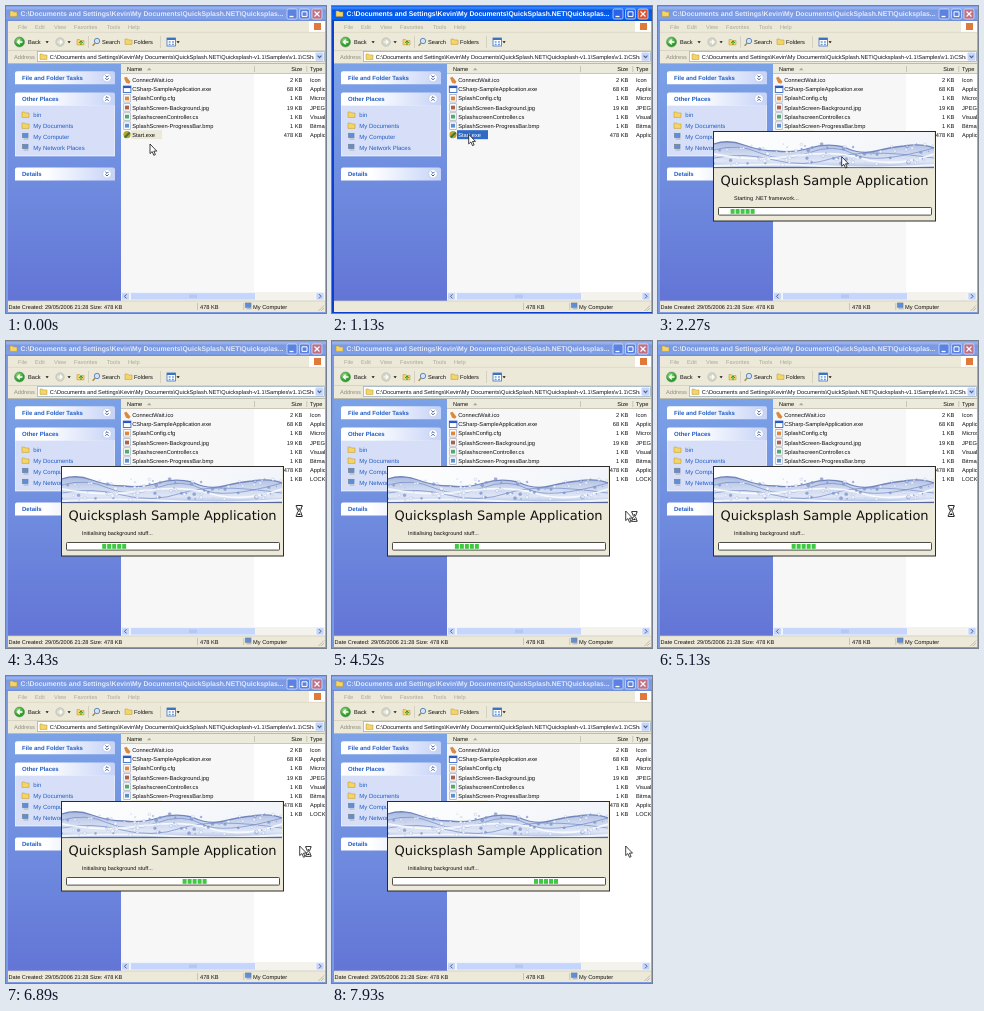
An HTML page that plays this animation: 320x307 px, repeating every 7990 ms.

```html
<!DOCTYPE html>
<html lang="en">
<head>
<meta charset="utf-8">
<title>Splash screen demo</title>
<style>
  html, body { margin: 0; width: 100%; height: 100%; overflow: hidden; }
  svg { display: block; width: 100vw; height: 100vh; }
  text { font-family: "Liberation Sans", Arial, sans-serif; font-size: 5.7px; text-rendering: geometricPrecision; white-space: pre; }
  .bold { font-weight: bold; font-size: 6px; }
  .link { font-size: 6px; }
</style>
</head>
<body>
<svg id="stage" viewBox="0 0 320 307" preserveAspectRatio="none">
  <defs>
    <linearGradient id="active" x2="0" y2="1">
      <stop offset="0" stop-color="#0a5be8"/><stop offset=".12" stop-color="#3a8cff"/>
      <stop offset=".3" stop-color="#0555e2"/><stop offset=".85" stop-color="#0663f5"/><stop offset="1" stop-color="#0342b8"/>
    </linearGradient>
    <linearGradient id="inactive" x2="0" y2="1">
      <stop offset="0" stop-color="#7697e7"/><stop offset=".12" stop-color="#9db6f0"/>
      <stop offset=".3" stop-color="#7b98e2"/><stop offset=".85" stop-color="#7f9fe9"/><stop offset="1" stop-color="#6c88d4"/>
    </linearGradient>
    <linearGradient id="pane" x2="0" y2="1"><stop offset="0" stop-color="#7ba2e7"/><stop offset="1" stop-color="#6375d6"/></linearGradient>
    <linearGradient id="head"><stop offset=".3" stop-color="#fff"/><stop offset="1" stop-color="#c6d3f7"/></linearGradient>
    <linearGradient id="sky" x2="1" y2=".2"><stop offset="0" stop-color="#fff"/><stop offset="1" stop-color="#f1f4f9"/></linearGradient>
    <linearGradient id="water" x2="0" y2="1">
      <stop offset="0" stop-color="#a9b8df"/><stop offset=".4" stop-color="#cbd6ee"/>
      <stop offset=".75" stop-color="#dfe7f6"/><stop offset="1" stop-color="#aebfe4"/>
    </linearGradient>
    <radialGradient id="green" cx=".4" cy=".35"><stop offset="0" stop-color="#a4e28f"/><stop offset="1" stop-color="#2c9a2c"/></radialGradient>
    <clipPath id="banner"><rect x="56" y="126" width="220" height="36"/></clipPath>
    <clipPath id="field"><rect x="34" y="45" width="274" height="11"/></clipPath>
  </defs>
</svg>
<script>
const NS = "http://www.w3.org/2000/svg";
const stage = document.getElementById("stage");
const LOOP = 7990, INK = "#111", BEIGE = "#ece9d8", BLUE = "#215dc6";

function add(tag, attrs, parent = stage) {
  const el = document.createElementNS(NS, tag);
  for (const k in attrs) el.setAttribute(k, attrs[k]);
  parent.appendChild(el);
  return el;
}
const group = (parent = stage) => add("g", {}, parent);
const rect = (x, y, width, height, fill, parent, more) => add("rect", { x, y, width, height, fill, ...more }, parent);
const path = (d, fill, parent, more) => add("path", { d, fill, ...more }, parent);
const line = (d, stroke, width, parent, more) => path(d, "none", parent, { stroke, "stroke-width": width, ...more });
const circle = (cx, cy, r, fill, parent, more) => add("circle", { cx, cy, r, fill, ...more }, parent);
function label(x, y, str, parent, more) {
  const el = add("text", { x, y, fill: INK, ...more }, parent);
  el.textContent = str;
  return el;
}
const show = (el, on) => el.setAttribute("display", on ? "inline" : "none");

const FOLDER = "C:\\Documents and Settings\\Kevin\\My Documents\\QuickSplash.NET\\Quicksplash";

function folderIcon(x, y) {
  path(`M${x} ${y + 1}h2.6l1 1h3.4v4.4h-7z`, "#f4d568", stage, { stroke: "#b8912e", "stroke-width": .5 });
}
function computerIcon(x, y) {
  rect(x, y, 5.5, 4.3, "#5a8fe0", stage, { stroke: "#77808c", "stroke-width": .7 });
  rect(x + 1, y + 5, 5, 1.4, "#b8bcc4");
}
function dropArrow(x, y) { path(`M${x} ${y}h3.2l-1.6 1.9z`, INK); }

// Window frame and title bar
const frameBox = rect(0, 0, 320, 307, "#7b98e2");
const titleBar = rect(0, 0, 320, 15, "url(#inactive)");
folderIcon(4, 4);
const titleText = label(14.5, 10.3, FOLDER.slice(0, -1) + "...", stage, { "font-weight": "bold", style: "font-size:6.83px" });
const buttons = [281, 293.5, 306].map(x => rect(x, 3, 10, 10, "#000", stage, { rx: 1.5, stroke: "#e4ebfb", "stroke-width": .7 }));
line("M283.5 10.5h4", "#fff", 1.3);
line("M296 5.8h5v4.6h-5z", "#fff", 1);
line("M308.5 5.5l5 5m0-5l-5 5", "#fff", 1.2);
rect(2, 15, 317, 291, BEIGE);

// Menu
const menu = [["File", 12], ["Edit", 29], ["View", 48], ["Favorites", 68], ["Tools", 101], ["Help", 122]];
for (const [name, x] of menu) label(x, 22.6, name, stage, { fill: "#aca899" });
rect(303, 15, 16, 11, "#fff");
rect(308, 17, 7, 7, "#e07a3a");
line("M2 26.3h317", "#d3cfbf", .6);

// Toolbar
circle(13.5, 36, 5, "url(#green)", stage, { stroke: "#4a934a", "stroke-width": .5 });
line("M16.5 36h-5m2.3-2.4l-2.4 2.4 2.4 2.4", "#fff", 1.3);
label(22, 38, "Back");
dropArrow(39.5, 35.3);
circle(54, 36, 4.2, "#d5d8c8", stage, { stroke: "#a9ac9c", "stroke-width": .5 });
line("M51.7 36h4.2m-1.9-2l2 2-2 2", "#fff", 1.1);
dropArrow(61.5, 35.3);
folderIcon(71, 32.5);
line("M75 39v-4m-1.8 2l1.8-2.2 1.8 2.2", "#2b9b33", 1);
rect(82, 30, .6, 12, "#c5c2b2");
circle(91, 35, 2.7, "#cfe4fa", stage, { stroke: "#5a7fae", "stroke-width": .9 });
line("M89 37.2l-2.4 2.6", "#a98238", 1.3);
label(96, 38, "Search");
folderIcon(119, 32);
label(128, 38, "Folders");
rect(154, 30, .6, 12, "#c5c2b2");
rect(161, 32, 8.5, 8, "#fff", stage, { stroke: "#3b72c4", "stroke-width": .8 });
rect(161, 32, 8.5, 2, "#3b72c4");
for (const x of [162.7, 166]) for (const y of [35.2, 37.7]) rect(x, y, 1.9, 1.5, "#6f9be0");
dropArrow(170.5, 35.3);
rect(2, 44, 317, .6, "#cbc7b6");

// Address row
label(8, 52.7, "Address", stage, { fill: "#8f8c80" });
rect(31.5, 45.7, 287, 9.8, "#fff", stage, { stroke: "#7f9db9", "stroke-width": .6 });
folderIcon(34, 47);
label(43.7, 52.6, FOLDER + "-v1.1\\Samples\\v1.1\\CSharp", stage, { style: "font-size:5.67px", "clip-path": "url(#field)" });
rect(309.5, 46.5, 8, 8.2, "#c6d5fb", stage, { rx: 1 });
line("M311.6 49.7l1.9 1.9 1.9-1.9", "#4d6185", 1.1);
rect(2, 57, 317, .7, "#aca899");

// Side pane
rect(2, 58, 113, 237, "url(#pane)");
function paneHeader(y, str, open) {
  path(`M9 ${y + 13}v-11q0-2 2-2h96q2 0 2 2v11z`, "url(#head)");
  label(16, y + 8.6, str, stage, { class: "bold", fill: BLUE });
  circle(101, y + 6.3, 4.2, "#fff", stage, { stroke: "#b6c4e6", "stroke-width": .6 });
  const s = open ? -1 : 1, cy = y + 6.3;
  line(`M99.4 ${cy - 2 * s}l1.6 ${1.6 * s} 1.6 ${-1.6 * s}M99.4 ${cy + .6 * s}l1.6 ${1.6 * s} 1.6 ${-1.6 * s}`, "#21428f", .9);
}
paneHeader(65.3, "File and Folder Tasks", false);
rect(9.3, 99, 99.4, 51, "#d6dff7", stage, { stroke: "#fff", "stroke-width": .6 });
paneHeader(86.5, "Other Places", true);
["bin", "My Documents", "My Computer", "My Network Places"].forEach((name, i) => {
  const y = 109 + 11 * i;
  if (i < 2) folderIcon(16, y - 4); else computerIcon(16.5, y - 3.7);
  label(27.3, y + 2, name, stage, { class: "link", fill: BLUE });
});
paneHeader(161.5, "Details", false);

// File list
rect(115, 58, 204, 237, "#fff");
rect(115, 68, 133, 218, "#f7f7f7");
rect(115, 58, 204, 10, "#ebeadb");
rect(115, 67, 204, 1, "#cbc7b8");
for (const x of [248, 300.5]) rect(x, 60, .7, 6, "#b9b6a6");
label(121, 65.1, "Name");
path("M141 64.3h4.4l-2.2-2.6z", "#aca899");
const SIZE_X = 296.3, TYPE_X = 304;
function sizeAndType(y, size, type, parent) {
  label(SIZE_X, y, size, parent, { "text-anchor": "end" });
  label(TYPE_X, y, type, parent);
}
sizeAndType(65.1, "Size", "Type");

const files = [
  ["ConnectWait.ico", "2 KB", "Icon", "#d98a3c"],
  ["CSharp-SampleApplication.exe", "68 KB", "Application", "#2456c4"],
  ["SplashConfig.cfg", "1 KB", "Microsoft", "#e0873e"],
  ["SplashScreen-Background.jpg", "19 KB", "JPEG Image", "#a8624e"],
  ["SplashscreenController.cs", "1 KB", "Visual C#", "#54a868"],
  ["SplashScreen-ProgressBar.bmp", "1 KB", "Bitmap", "#5a90d0"],
  ["Start.exe", "478 KB", "Application", "#c2a02a"]
];
const rowY = i => 74.2 + 9.08 * i;
function fileIcon(i, y, color) {
  if (i === 0) {
    path(`M118 ${y - 2.5}l2.5-1 4 5-1.5 2-3-1z`, color);
  } else if (i === 1) {
    rect(117.3, y - 3.2, 7.6, 6.4, "#fff", stage, { stroke: color, "stroke-width": .8 });
    rect(117.3, y - 3.2, 7.6, 2, color);
  } else if (i === 6) {
    circle(121, y, 3.6, color);
    path(`M118 ${y + 2}l5-5 1.5 1.5-5 5z`, "#3f7a34");
  } else {
    rect(117.8, y - 3.7, 6.4, 7.4, "#fff", stage, { stroke: "#8a97ad", "stroke-width": .6 });
    rect(119, y - 1.8, 4, 3.8, color);
  }
}
const pick = rect(125, rowY(6) - 4.5, 31, 9, BEIGE);
let startName;
files.forEach(([name, size, type, color], i) => {
  const y = rowY(i);
  fileIcon(i, y, color);
  startName = label(126.2, y + 2.1, name);
  sizeAndType(y + 2.1, size, type);
});
const lockRow = group();
sizeAndType(rowY(7) + 2.1, "1 KB", "LOCK File", lockRow);
rect(319, 15, 1, 291, "#93abe6");

// Horizontal scroll bar
rect(115, 286, 204, 8.6, "#f3f2ec");
for (const [x, width] of [[115.5, 8], [124.5, 125], [310, 8]])
  rect(x, 286.6, width, 7.4, "#c6d5fb", stage, { rx: 1, stroke: "#fff", "stroke-width": .6 });
line("M120.5 288.2l-2 2.1 2 2.1M313 288.2l2 2.1-2 2.1", "#4d6185", 1);
line("M184 288.6v3.6m2-3.6v3.6m2-3.6v3.6m2-3.6v3.6", "#9db4ea", .8);

// Status bar
rect(2, 295, 317, 11, BEIGE);
rect(2, 294.6, 317, .7, "#c5c2b2");
for (const x of [191, 237.5]) rect(x, 297, .7, 7, "#b9b6a6");
const statusText = label(2.5, 303, "Date Created: 29/05/2006 21:28 Size: 478 KB", stage, { style: "font-size:5.6px" });
label(194, 303, "478 KB");
computerIcon(239.5, 297);
label(247, 303, "My Computer");
line("M312.5 305l5.5-5.5m-3 5.5l3-3", "#b9b6a6", .9);

// Splash window
const splash = group();
rect(55.5, 125.5, 222, 89.5, BEIGE, splash, { stroke: "#2b2b2b", "stroke-width": 1 });
const banner = add("g", { "clip-path": "url(#banner)" }, splash);
const surface = "M56 138q14-5 30 1t32 6q18 2 34-3t34-1q16 8 32 4t28-5q18-3 30 2";
rect(56, 126, 220, 36, "url(#sky)", banner);
path(surface + "v20h-220z", "url(#water)", banner);
line(surface, "#7286bd", 1.3, banner);
line("M56 144q24-7 46 3t48 0 46 1 80-6M56 152q30-6 60 2t60-2 100 0", "#7389c4", 1, banner, { opacity: .7 });
line("M56 148q40 8 80 2t70 3 70-5M56 160q60-3 110 0t110-1", "#fff", 1.8, banner, { opacity: .8 });
let seed = 7;
const random = () => (seed = seed * 16807 % 2147483647) / 2147483647;
for (let i = 0; i < 110; i++) {
  const x = 56 + random() * 220, y = 138 + random() * 21;
  circle(x, y, .4 + random() * 1.4, i % 3 ? "#f6f9fe" : "#8598cc", banner, { opacity: .8, stroke: "#6f86c0", "stroke-width": .25 });
}
rect(56, 161.2, 220, .9, "#3d5286", splash);
label(62.6, 179, "Quicksplash Sample Application", splash, { style: 'font-family:"DejaVu Sans",Verdana,sans-serif;font-size:13px' });
const message = label(76, 193.8, "", splash, { style: "font-size:5.5px" });
rect(60.5, 201.5, 213, 7.6, "#fff", splash, { stroke: "#4d4d48", "stroke-width": 1, rx: .8 });
const blocks = group(splash);
for (let i = 0; i < 5; i++) rect(i * 5 + .6, 203, 4, 4.8, "#3fc943", blocks);

// Pointer
const pointer = group();
const arrow = path("M0 0v9.6l2.2-2 1.6 3.7 1.6-.7-1.6-3.5h3z", "#fff", pointer, { stroke: "#111", "stroke-width": .8 });
const glass = group(pointer);
path("M0 0h6v1.2h-.6q0 2.8-1.8 4.3 1.8 1.5 1.8 4.3h.6v1.2h-6v-1.2h.6q0-2.8 1.8-4.3-1.8-1.5-1.8-4.3h-.6z", "#fff", glass, { stroke: "#111", "stroke-width": .9 });
path("M1.8 3h2.4l-1.2 2zM1.4 9.4l1.6-2 1.6 2z", "#111", glass);

// Linear interpolation through [time, value] points
function track(points, t) {
  if (t <= points[0][0]) return points[0][1];
  for (let i = 1; i < points.length; i++) {
    const [t0, v0] = points[i - 1], [t1, v1] = points[i];
    if (t <= t1) return v0 + (v1 - v0) * (t - t0) / (t1 - t0);
  }
  return points[points.length - 1][1];
}
const progress = [[1850, 63], [2270, 72], [3430, 96], [4520, 123], [5200, 135], [5930, 153], [6890, 176], [7690, 195], [7930, 202]];
const pointerX = [[1850, 136.7], [2270, 183.7], [2690, 188], [3300, 293.7]];
const pointerY = [[1850, 128.3], [2270, 150.7], [2690, 153], [3300, 170]];

// Pointer kinds change at fixed times
const kinds = [[0, "arrow"], [1650, "busy"], [1910, "arrow"], [2990, "wait"], [3850, "busy"], [4760, "wait"], [5500, "busy"], [7750, "arrow"]];

function draw(t) {
  const active = t >= 1130 && t < 1850;
  const tick = t < 1850 ? t : 1850 + Math.floor((t - 1850) / 60 + .001) * 60;

  frameBox.setAttribute("fill", active ? "#0b3fd0" : "#7b98e2");
  titleBar.setAttribute("fill", active ? "url(#active)" : "url(#inactive)");
  titleText.setAttribute("fill", active ? "#fff" : "#e2eafa");
  buttons.forEach((button, i) => {
    const close = i === 2;
    button.setAttribute("fill", active ? (close ? "#e0502c" : "#2a63e8") : (close ? "#c07086" : "#5b82e0"));
  });
  pick.setAttribute("fill", active ? "#316ac5" : BEIGE);
  startName.setAttribute("fill", active ? "#fff" : INK);
  show(statusText, t < 1130 || t >= 1190);
  show(lockRow, t >= 2870);

  show(splash, t >= 1850);
  message.textContent = t < 2870 ? "Starting .NET framework..." : "Initialising background stuff...";
  blocks.setAttribute("transform", `translate(${track(progress, tick).toFixed(2)} 0)`);

  const kind = kinds.filter(k => k[0] <= t).pop()[1];
  const x = t < 200 ? 144 : track(pointerX, tick), y = t < 200 ? 138 : track(pointerY, tick);
  pointer.setAttribute("transform", `translate(${x} ${y})`);
  show(arrow, kind !== "wait");
  show(glass, kind !== "arrow");
  glass.setAttribute("transform", kind === "wait" ? "translate(-3.5 -5.5)" : "translate(6 .5) scale(.9)");
}

const start = performance.now();
function frame() {
  draw((performance.now() - start) % LOOP);
  requestAnimationFrame(frame);
}
draw(0);
requestAnimationFrame(frame);
</script>
</body>
</html>
```
